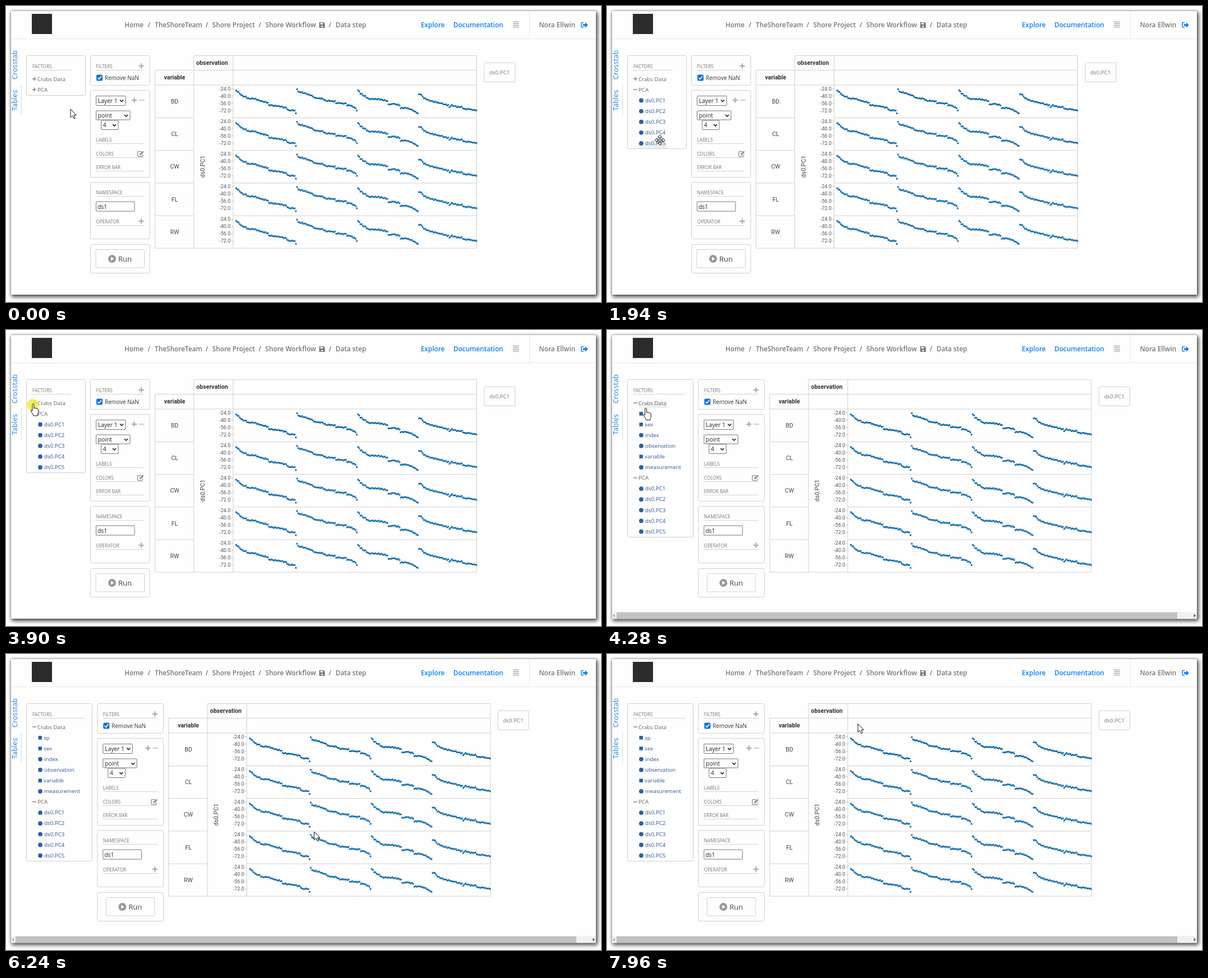
Recreate the animation shown at these times as an HTML page. Size 1060 px wide and 528 px high, loop 8 s.

```html
<!DOCTYPE html>
<html lang="en">
<head>
<meta charset="utf-8">
<title>Data step</title>
<style>
html, body { margin: 0; width: 100%; height: 100%; overflow: hidden; background: #fff; }
#win { position: absolute; left: 9px; top: 9px; width: 1042px; height: 506px; background: #fefefe;
  box-shadow: 2px 3px 7px 1px rgba(0,0,0,.72), 0 0 2px rgba(0,0,0,.5); }
svg { position: absolute; left: 0; top: 0; display: block; }
text { font-family: "Open Sans", "Noto Sans", sans-serif; white-space: pre; }
.nav { font-size: 11.8px; font-weight: 600; }
.cap { font-size: 8.2px; fill: #777; }
.item { font-size: 9.75px; }
.ctl { font-size: 10.3px; fill: #222; }
.tab { font-size: 12.7px; fill: #1a86f0; }
.cell { font-family: Roboto, Arial, sans-serif; font-size: 10.5px; fill: #444; text-anchor: middle; }
.head { font-family: Roboto, Arial, sans-serif; font-size: 10.6px; font-weight: 700; fill: #333; }
.tick { font-family: Roboto, Arial, sans-serif; font-size: 9px; fill: #555; text-anchor: end; }
</style>
</head>
<body>
<div id="win"></div>
<svg id="stage" width="1060" height="528" viewBox="0 0 1060 528">
  <defs>
    <linearGradient id="shade" x1=".25" y1="0" x2=".6" y2="1">
      <stop offset=".2" stop-color="#fefefe"/><stop offset="1" stop-color="#ebebeb"/>
    </linearGradient>
  </defs>
  <rect id="hover" height="18" fill="url(#shade)"/>
  <g id="header"></g>
  <g id="scenes"></g>
  <circle id="click" r="10.5" fill="#f5e838" fill-opacity=".8"/>
  <path id="cursor" fill="#fff" stroke="#111" stroke-linejoin="round"/>
</svg>
<script>
const LOOP = 8000, OPEN_PCA = 1400, OPEN_DATA = 3980;
const ROW = 19.1, FIRST_ROW = 130;
const $ = id => document.getElementById(id);

const text = (x, y, s, cls, attrs = '') => `<text x="${x}" y="${y}" class="${cls}" ${attrs}>${s}</text>`;
const upright = (x, y, s, cls) => `<text transform="translate(${x} ${y}) rotate(-90)" class="${cls}">${s}</text>`;
const line = (d, color = '#d2d2d2', w = 1) => `<path d="${d}" fill="none" stroke="${color}" stroke-width="${w}"/>`;
const box = (x, y, x2, y2, color = '#d0d0d0', r = 2) =>
  `<rect x="${x}" y="${y}" width="${x2 - x}" height="${y2 - y}" rx="${r}" fill="none" stroke="${color}"/>`;
const shift = (dx, s) => `<g transform="translate(${dx} 0)">${s}</g>`;
const minus = (x, y, r, color = '#aaa', w = 2) => line(`M${x - r} ${y}h${2 * r}`, color, w);
const plus = (x, y, r, color = '#aaa', w = 2) => minus(x, y, r, color, w) + line(`M${x} ${y - r}v${2 * r}`, color, w);

function header() {
  const gray = 'fill="#777"', blue = 'fill="#0d80f8"';
  const crumbs = [[211, 'Home'], [265, 'TheShoreTeam'], [367.5, 'Shore Project'], [462, 'Shore Workflow'], [587, 'Data step']];
  const slashes = [252.5, 355.5, 450, 575];
  return `<rect x="46" y="14" width="36" height="36" fill="#2b2b2b"/>`
    + line('M9 58.5H1051M932.5 9V58', '#e6e6e6')
    + crumbs.map(([x, s]) => text(x, 38, s, 'nav', gray)).join('')
    + slashes.map(x => text(x, 38, '/', 'nav', gray)).join('')
    + `<path d="M558 29h8l2 2v8h-10z" fill="#777"/><path d="M559.7 30.2h5v2.6h-5zM561.5 35.2h3v2.5h-3z" fill="#fff"/>`
    + text(739, 38, 'Explore', 'nav', blue) + text(797, 38, 'Documentation', 'nav', blue)
    + line('M903 28.5h11M903 31.5h11M903 34.5h11M903 37.5h11', '#888')
    + text(949.5, 38, 'Nora Ellwin', 'nav', gray)
    + line('M1029 29.5h-2.5q-1.5 0-1.5 1.5v5.500q0 1.500 1.500 1.500h2.500', '#0d80f8', 1.6)
    + `<path d="M1028 32.300h4v-3l4.800 4.700-4.800 4.700v-3h-4z" fill="#0d80f8"/>`
    + upright(20, 131, 'Crosstab', 'tab') + upright(20, 187, 'Tables', 'tab')
    + line('M27.5 139V196', '#d8d8d8');
}

function factors(state) {
  const right = state === 2 ? 153.5 : 141.5;
  const bottom = [159.5, 254.5, 369.5][state];
  const group = (s, open) => y => (open ? minus : plus)(50.5, y, 3.5, '#888', 1.5) + text(56, y + 3.5, s, 'item', 'fill="#666"');
  const item = (s, square) => y => (square
    ? `<rect x="57.5" y="${y - 3}" width="6.500" height="6.500" fill="#2962a5"/>`
    : `<circle cx="61" cy="${y + .3}" r="3.900" fill="#2962a5"/>`)
    + text(square ? 67 : 68, y + 3.5, s, 'item', 'fill="#2b5797"');
  const rows = [group('Crabs Data', state === 2)];
  if (state === 2) rows.push(item('sp', true), item('sex', true), item('index'),
    item('observation'), item('variable', true), item('measurement'));
  rows.push(group('PCA', state > 0));
  if (state > 0) for (let i = 1; i <= 5; i++) rows.push(item('ds0.PC' + i));
  return box(36.5, 88.5, right, bottom) + text(47, 111, 'FACTORS', 'cap')
    + line(`M47 114.500H${state === 2 ? 140 : 116}`)
    + rows.map((row, i) => row(FIRST_ROW + i * ROW)).join('');
}

function settings(wide) {
  const grow = wide ? 12 : 0;
  const right = 256 + grow, edge = 245.5 + grow;
  const section = (s, y) => text(160.5, y, s, 'cap') + line(`M160 ${y + 3.5}H${edge}`);
  const select = (x, y, x2, y2, s) => box(x, y, x2, y2, '#777', 1) + text(x + 3.3, y + 12.4, s, 'ctl')
    + line(`M${x2 - 10} ${y + 7}l3 3 3-3`, '#222', 1.700);
  const panels = [[88.5, 141.5], [150.5, 305.5], [314.5, 415.5], [425.5, 476.5]];
  return panels.map(([y, y2]) => box(150.5, y, right, y2)).join('')
    + section('FILTERS', 111) + plus(241 + grow, 107, 4.7)
    + `<rect x="161" y="122.500" width="11" height="11" rx="2" fill="#0b74d8"/>`
    + line('M163.300 128l2.400 2.500 4.300-5.200', '#fff', 1.700)
    + text(176, 131.7, 'Remove NaN', 'item', 'fill="#333" style="font-size:10px"')
    + select(160.5, 160.5, 213, 177.5, 'Layer 1') + plus(228.500 + grow, 168, 4.7) + minus(242 + grow, 168, 4.7, '#ccc')
    + select(160.5, 187, 221, 203, 'point') + select(169.5, 204, 200, 220.5, '4')
    + section('LABELS', 242) + section('COLORS', 267) + section('ERROR BAR', 291)
    + shift(grow, line('M241 259.500h-5q-1.500 0-1.500 1.500v6q0 1.500 1.500 1.500h6q1.500 0 1.500-1.500v-2.500', '#999', 1.400)
      + line('M238.500 265.500l6-6', '#888', 2.600))
    + section('NAMESPACE', 336) + box(160.5, 349, 229, 366, '#777', 1) + text(163, 361.5, 'ds1', 'ctl')
    + section('OPERATOR', 388) + plus(241 + grow, 384, 4.7)
    + shift(grow / 2, box(160, 434.5, 246.5, 467, '#d0d0d0', 1)
      + `<circle cx="189" cy="451" r="7" fill="#999"/><path d="M187 447.500l5.500 3.500-5.500 3.500z" fill="#fff"/>`
      + text(200, 456, 'Run', 'ctl', 'style="font-size:13px;fill:#444"'));
}

// Each curve is a few [index, height] corners out of its fifty samples.
const CURVES = [
  [[0,150],[2,154],[5,160],[8,162],[10,165.5],[15,165.5],[20,169],[26,172.5],[27,177],[33,178],[41,181.500],[43,186],[48,186.500],[49,191.500]],
  [[0,148],[1,153],[8,156.500],[12,160],[14,163.500],[20,165],[24,169],[31,170],[32,173],[40,174],[41,177],[44,177.500],[47,181],[49,185.500]],
  [[0,150],[2,156],[6,161.500],[9,166],[17,166],[22,168.500],[24,169.500],[25,176],[29,174],[34,177],[35,182],[40,181.500],[46,187],[49,192]],
  [[0,157],[1,157],[4,164],[8,168.500],[15,172],[20,175],[24,177],[25,180],[27,177],[33,181],[35,180],[37,183.500],[42,184],[47,186.500]]
];
function heightAt(curve, i) {
  const n = Math.max(1, curve.findIndex(p => p[0] >= i));
  const [a, b] = [curve[n - 1], curve[n]];
  return a[1] + (b[1] - a[1]) * (i - a[0]) / (b[0] - a[0]);
}
function dots() {
  let d = '';
  for (let i = 0; i < 198; i++) {
    const k = i % 50, wobble = k ? Math.sin(i * 2.3) * .6 : 0;
    const x = 410 + i * 2.172, y = heightAt(CURVES[Math.floor(i / 50)], k) + wobble;
    d += `M${(x - 1.5).toFixed(1)} ${Math.round(y - 1.5)}h3v3h-3z`;
  }
  return `<path d="${d}" fill="#1f77b4"/>`;
}

function table() {
  const pitch = 58.2, points = dots();
  const rows = ['BD', 'CL', 'CW', 'FL', 'RW'].map((name, r) => {
    const labels = [24, 40, 56, 72].map((v, i) => {
      const y = 147.5 + i * 13;
      return text(400, y + 3.2, `-${v}.0`, 'tick') + line(`M401.500 ${y}h3`, '#bbb');
    }).join('');
    const rule = r ? line('M265 141.300H335M405 141.300H839') : '';
    return `<g transform="translate(0 ${r * pitch})">${rule}${text(300.5, 174, name, 'cell')}${labels}${points}</g>`;
  }).join('');
  return line('M335 88.500H839M265 114.500H839M265 141H839M265 432H839')
    + line('M265.500 114.500V432M334.500 88.500V432M404.500 88.500V432M838.500 88.500V432')
    + text(339, 105, 'observation', 'head') + text(281.5, 131, 'variable', 'head')
    + `<g transform="translate(353.500 286.500) rotate(-90)">${text(0, 0, 'ds0.PC1', 'cell')}</g>`
    + rows + box(852, 101, 907, 135.5) + text(861, 122, 'ds0.PC1', 'item', 'fill="#777"');
}

const scrollbar = () => `<rect x="9" y="503" width="1042" height="12.500" fill="#f1f1f1"/>`
  + `<rect x="17" y="503.500" width="999" height="11.500" fill="#c1c1c1"/>`
  + `<path d="M14 506.500v6l-3.500-3z" fill="#a3a3a3"/><path d="M1045.500 506.500v6l3.500-3z" fill="#505050"/>`;

const scene = state => {
  const wide = state === 2;
  return `<g>${factors(state)}${shift(wide ? 12.3 : 0, settings(wide))}${shift(wide ? 24.4 : 0, table())}${wide ? scrollbar() : ''}</g>`;
};

const SHAPES = {
  arrow: 'M0 0V15L3.500 11.800 6 17 8.300 16 6 10.800H10.300Z',
  hand: 'M-1.600 12V1.400C-1.600-.4 1.400-.4 1.400 1.400V8C1.400 6.500 4 6.700 4 8.300 4 7 6.600 7.200 6.600 8.900 6.600 7.800 9 8 9 10V15C9 18 7.500 18 7.500 21H.5C.5 18-4 14.500-4.300 12.200-4 10.600-2.500 11-1.600 12.500Z',
  move: 'M0-9L3.500-5H1V-1H5V-3.500L9 0 5 3.500V1H1V5H3.500L0 9-3.500 5H-1V1H-5V3.500L-9 0-5-3.500V-1H-1V-5H-3.500Z',
  resize: 'M-9 0L-5-4V-1H5V-4L9 0 5 4V1H-5V4Z'
};

// first step, last step, step count, x, y, shape ("list" depends on the row below)
const MOVES = [
  [80, 220, 3, 38, 147, 'arrow'], [460, 540, 2, 43, 147, 'arrow'],
  [700, 780, 2, 47, 147, 'hand'], [1000, 1000, 1, 50, 150, 'list'],
  [1560, 1780, 4, 94, 251, 'list'], [1940, 2490, 8, 95, 157, 'list'],
  [2570, 2720, 3, 93, 145, 'list'], [2800, 3200, 6, 52, 130, 'list'],
  [3360, 3360, 1, 48.5, 132, 'list'], [4200, 4440, 4, 90, 147, 'list'],
  [4600, 5140, 8, 89, 218, 'list'], [5220, 5380, 3, 90, 239, 'list'],
  [5620, 6160, 8, 525, 325, 'arrow'], [6240, 6240, 1, 549, 317, 'arrow'],
  [6320, 6400, 2, 503, 232, 'arrow'], [6480, 6940, 7, 422, 100, 'arrow'],
  [7020, 7020, 1, 436, 99, 'resize'], [7180, 7180, 1, 440, 99, 'resize'],
  [7340, 7720, 6, 451, 122, 'arrow'], [7880, 7960, 2, 447, 124.5, 'arrow']
];

function pointerAt(t) {
  let x = 115, y = 184, shape = 'arrow';
  for (const [from, to, count, nx, ny, kind] of MOVES) {
    if (t < from) break;
    const gap = (to - from) / Math.max(1, count - 1);
    const step = gap ? Math.min(count, Math.floor((t - from) / gap + 1e-6) + 1) : count;
    x += (nx - x) * step / count;
    y += (ny - y) * step / count;
    shape = kind;
  }
  return { x, y, shape };
}

$('header').innerHTML = header();
$('scenes').innerHTML = [0, 1, 2].map(scene).join('');
const scenes = [...$('scenes').children];
const show = (node, on) => { node.style.display = on ? '' : 'none'; };

function draw(t) {
  const state = t < OPEN_PCA ? 0 : t < OPEN_DATA ? 1 : 2;
  scenes.forEach((node, i) => show(node, i === state));

  let { x, y, shape } = pointerAt(t);
  const row = Math.floor((y - FIRST_ROW) / ROW + .5);
  const onList = shape === 'list';
  if (onList) shape = row < (state === 2 ? 1 : 2) ? 'hand' : 'move';
  $('cursor').setAttribute('d', SHAPES[shape]);
  $('cursor').setAttribute('transform', `translate(${x} ${y})`);

  const hover = $('hover');
  show(hover, onList && t >= 1320 && row >= (t < 4200 ? 1 : 0));
  hover.setAttribute('x', 56);
  hover.setAttribute('y', FIRST_ROW + row * ROW - 9);
  hover.setAttribute('width', state === 2 && row > 0 ? 75 : 50.5);

  const click = $('click');
  const second = t >= 3900;
  show(click, (t >= 1320 && t < OPEN_PCA) || (second && t < OPEN_DATA));
  click.setAttribute('cx', second ? 47.5 : 48.5);
  click.setAttribute('cy', second ? 133.5 : 150);
}

const start = performance.now();
function tick() {
  draw((performance.now() - start) % LOOP);
  requestAnimationFrame(tick);
}
tick();
</script>
</body>
</html>
```
